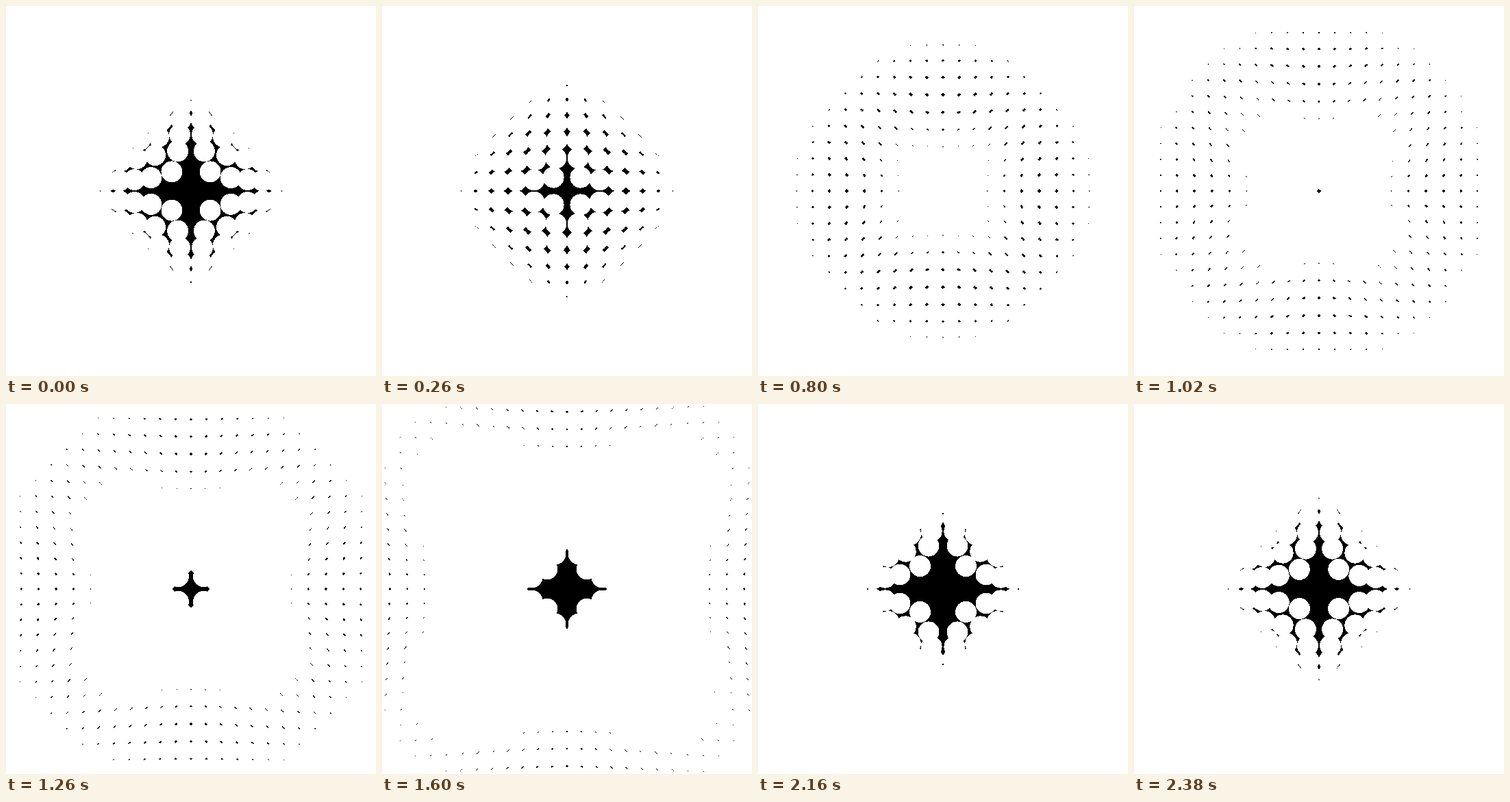
An HTML page with a canvas that plays this animation: 540x540 px, repeating every 2400 ms.

```html
<!DOCTYPE html>
<html lang="en">
<head>
<meta charset="utf-8">
<title>Dot ripple</title>
<style>
  html, body { margin: 0; width: 100%; height: 100%; overflow: hidden; background: #fff; }
  canvas { display: block; width: 540px; height: 540px; }
</style>
</head>
<body>
<canvas id="stage" width="540" height="540"></canvas>
<script>
const SIZE = 540;
const CENTER = SIZE / 2;
const LOOP = 2400;
const STEP = 20;
const SPACING = 20;
const RADIUS = 15.35;
const AMPLITUDE = 17.5;
const DELAY = 6.4;       // ms of lag per pixel from the centre
const PEAK = 508;        // ms before the loop point at which the centre peaks
const INK_LEVEL = 100;   // darker than this becomes solid black

const ctx = document.getElementById('stage').getContext('2d', { willReadFrequently: true });

// White dots on a half-offset grid, stored as direction and distance.
const dots = [];
for (let i = -20; i < 20; i++) {
  for (let j = -20; j < 20; j++) {
    const x = (i + 0.5) * SPACING;
    const y = (j + 0.5) * SPACING;
    const dist = Math.hypot(x, y);
    dots.push({ ux: x / dist, uy: y / dist, dist });
  }
}

function push(dist, time) {
  const phase = (time - dist * DELAY + PEAK) / LOOP;
  return AMPLITUDE * (1 + Math.cos(2 * Math.PI * phase));
}

// Hard black and white edges.
function harden() {
  const image = ctx.getImageData(0, 0, SIZE, SIZE);
  const pixels = new Uint32Array(image.data.buffer);
  for (let i = 0; i < pixels.length; i++) {
    pixels[i] = (pixels[i] & 255) < INK_LEVEL ? 0xff000000 : 0xffffffff;
  }
  ctx.putImageData(image, 0, 0);
}

function draw(time) {
  ctx.fillStyle = '#000';
  ctx.fillRect(0, 0, SIZE, SIZE);
  ctx.fillStyle = '#fff';
  const limit = CENTER + RADIUS + 1;
  for (const { ux, uy, dist } of dots) {
    const reach = dist + push(dist, time);
    const x = ux * reach;
    const y = uy * reach;
    if (Math.abs(x) > limit || Math.abs(y) > limit) continue;
    ctx.beginPath();
    ctx.arc(CENTER + x, CENTER + y, RADIUS, 0, 2 * Math.PI);
    ctx.fill();
  }
  harden();
}

const start = performance.now();
let shown = -1;

function tick() {
  const elapsed = Math.max(0, performance.now() - start) % LOOP;
  const time = Math.floor(elapsed / STEP) * STEP;
  if (time !== shown) {
    draw(time);
    shown = time;
  }
  requestAnimationFrame(tick);
}

tick();
</script>
</body>
</html>
```
